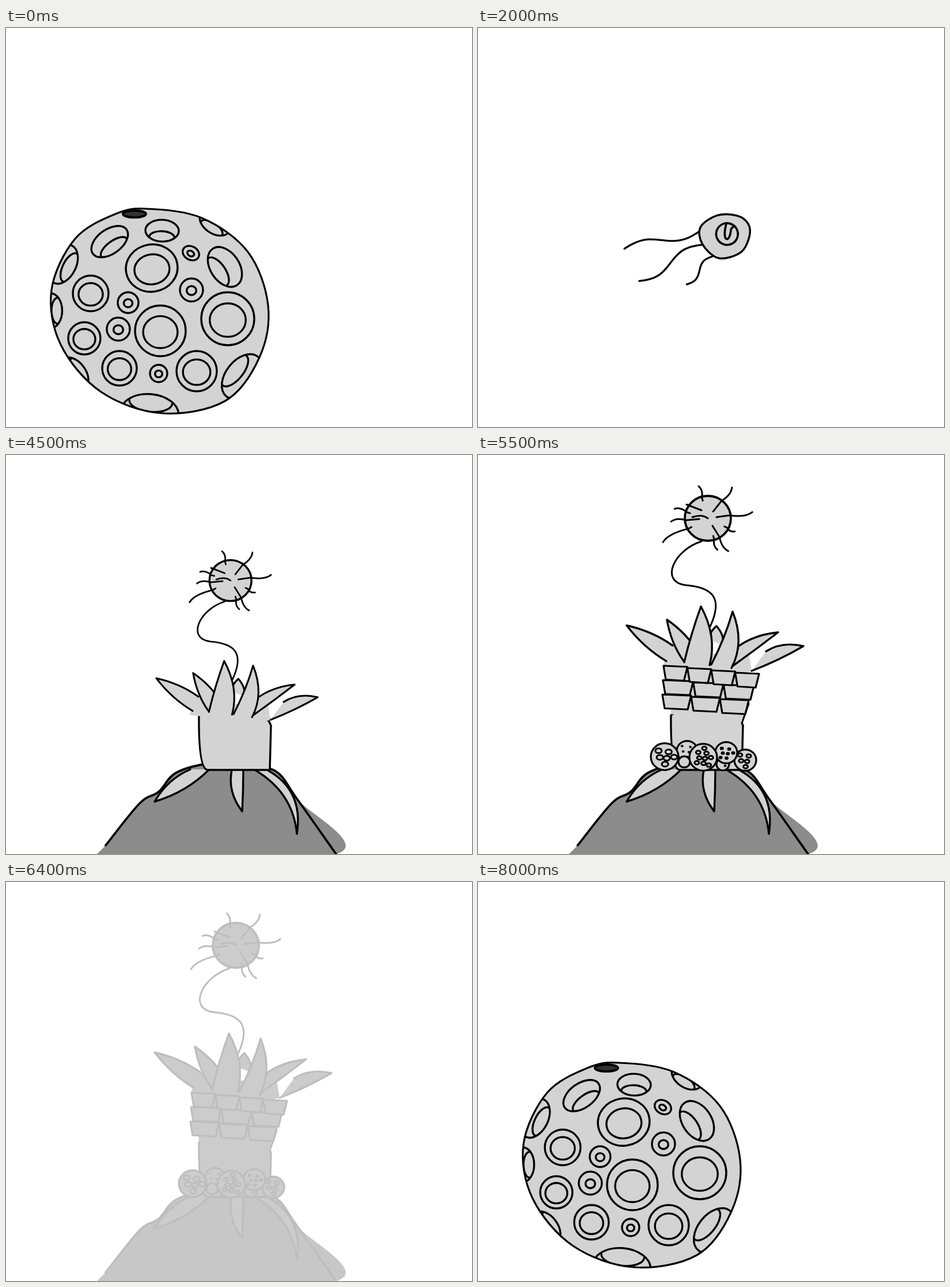
Animation of 809 by 693 pixels, one loop 8.1 s. Source, as an HTML page with a canvas:

```html
<!DOCTYPE html>
<html lang="en">
<head>
<meta charset="utf-8">
<title>Life cycle sketch</title>
<style>
html, body { margin: 0; width: 100%; height: 100%; overflow: hidden; background: #fff; }
canvas { display: block; }
</style>
</head>
<body>
<canvas width="809" height="693"></canvas>
<script>
const ctx = document.querySelector('canvas').getContext('2d');
const PALE = '#d3d3d3', ROCK = '#8c8c8c', TURN = Math.PI * 2;

function ink(path, fill, width = 3) {
  if (fill) { ctx.fillStyle = fill; ctx.fill(path); }
  if (width) { ctx.lineWidth = width; ctx.stroke(path); }
}
const draw = (d, fill, width) => ink(new Path2D(d), fill, width);

// Smooth path through a few key points.
function smooth(n, closed) {
  const size = n.length / 2;
  const at = i => {
    i = closed ? (i + size) % size : Math.max(0, Math.min(size - 1, i));
    return [n[2 * i], n[2 * i + 1]];
  };
  const path = new Path2D();
  path.moveTo(...at(0));
  for (let i = 0; i < size - (closed ? 0 : 1); i++) {
    const [a, b, c, d] = [at(i - 1), at(i), at(i + 1), at(i + 2)];
    path.bezierCurveTo(b[0] + (c[0] - a[0]) / 6, b[1] + (c[1] - a[1]) / 6,
      c[0] - (d[0] - b[0]) / 6, c[1] - (d[1] - b[1]) / 6, c[0], c[1]);
  }
  return path;
}

function oval(x, y, rx, ry = rx, fill = null, width = 3, from = 0, to = TURN) {
  const path = new Path2D();
  path.ellipse(x, y, rx, ry, 0, from, to);
  ink(path, fill, width);
}

function placed(shape, x, y, scale, angle = 0, ox = 0, oy = 0) {
  ctx.save();
  ctx.translate(x, y);
  ctx.rotate(angle);
  ctx.scale(scale, scale);
  ctx.translate(-ox, -oy);
  shape();
  ctx.restore();
}

const MOON = { x: 266, y: 491, rx: 188, ry: 178 };

// Craters seen at a slant show only the far lip of their floor.
function crater(x, y, r, squash = 1) {
  const out = Math.atan2(y - MOON.y, x - MOON.x) + TURN / 4;
  const h = r * squash, floor = r < 21 ? 0.42 : 0.68;
  placed(() => {
    oval(0, 0, r, h, null, 3.4);
    if (squash < 0.75) oval(0, h * 0.6, r * 0.75, h * 0.55, null, 3.4, TURN / 2, TURN);
    else oval(0, r * 0.05, r * floor, h * floor * 0.93, null, 3.4);
  }, x, y, 1, squash < 1 ? out : 0);
}

function moon() {
  const body = smooth([245, 314, 340, 330, 420, 389, 455, 482, 440, 572, 380, 648,
    270, 669, 165, 632, 95, 550, 79, 455, 120, 366, 190, 323], true);
  ink(body, PALE, 0);
  ctx.save();
  ctx.clip(body);
  [[271, 352, 29], [180, 371, 36], [321, 391, 15], [253, 417, 45], [380, 415, 38]]
    .forEach(([x, y, r]) => {
      const d = Math.hypot(x - MOON.x, y - MOON.y) / 183;
      crater(x, y, r, Math.sqrt(1 - d * d));
    });
  [[322, 455, 20], [147, 461, 31], [212, 477, 18], [195, 523, 20], [136, 539, 28],
   [268, 526, 44], [385, 505, 46], [197, 591, 30], [265, 600, 15], [331, 596, 35]]
    .forEach(c => crater(...c));
  [[95, 50], [40, 44], [142, 32], [180, 30], [207, 36], [301, 29]].forEach(([deg, r]) => {
    const a = deg / 360 * TURN;
    crater(MOON.x + MOON.rx * Math.cos(a), MOON.y + MOON.ry * Math.sin(a), r, 0.65);
  });
  oval(223, 323, 20, 6, '#333', 4);
  ctx.restore();
  ink(body, null, 3.2);
}

// S-shaped thread: one sine wave along the straight way between its ends.
function tail(x1, y1, x2, y2, amp, width) {
  const dx = x2 - x1, dy = y2 - y1, len = Math.hypot(dx, dy), pts = [];
  for (let i = 0; i <= 12; i++) {
    const s = i / 12, w = amp * Math.sin(TURN * s) / len;
    pts.push(x1 + dx * s - dy * w, y1 + dy * s + dx * w);
  }
  ink(smooth(pts), null, width);
}

const nucleus = (x, y, scale, angle) => placed(() => {
  oval(0, 0, 23, 23, null, 4.5);
  draw('M-7 -18C-7 18 10 18 6 -8Q4 -16 12 -20', null, 4.5);
}, x, y, scale, angle);

function swimmer() {
  tail(512, 318, 368, 394, -9, 4);
  tail(524, 344, 416, 452, 10, 4);
  tail(552, 362, 515, 433, 7, 4);
  ink(smooth([512, 308, 540, 275, 580, 265, 607, 275, 617, 300, 608, 338, 566, 362, 525, 342], true), PALE, 4.2);
  nucleus(570, 308, 1, 0);
}
const swim = (x, y, scale, angle) => placed(swimmer, x, y, scale, angle, 492, 358);

function settler() {
  tail(358, 545, 328, 661, -7);
  tail(380, 552, 382, 665, 9);
  tail(404, 545, 424, 601, 6);
  ink(smooth([387, 474, 413, 487, 420, 520, 408, 547, 383, 551, 354, 538, 356, 497], true), PALE, 3.5);
  nucleus(385, 510, 0.75, -0.8);
}

function mound() {
  const ridge = [173, 678, 232, 605, 265, 585, 295, 552, 353, 536, 415, 542, 468, 549, 505, 597, 573, 693];
  ink(smooth([...ridge, 158, 693]), ROCK, 0);
  ink(smooth(ridge), null, 3.8);
}

// Pointed leaf from two base points to a tip; bow bends it sideways.
function blade(x1, y1, tipX, tipY, x2, y2, bow = 0, bulge = 9) {
  const mx = (x1 + x2) / 2, my = (y1 + y2) / 2, len = Math.hypot(tipX - mx, tipY - my);
  const nx = (my - tipY) / len, ny = (tipX - mx) / len;
  const side = Math.sign((x1 - mx) * nx + (y1 - my) * ny);
  const bend = (x, y, w) => `${(x + tipX) / 2 + nx * w} ${(y + tipY) / 2 + ny * w}`;
  draw(`M${x1} ${y1}Q${bend(x1, y1, bow + side * bulge)} ${tipX} ${tipY}
    Q${bend(x2, y2, bow - side * bulge)} ${x2} ${y2}`, PALE, 3.4);
}

function stump() {
  blade(353, 546, 258, 602, 320, 546, 0, 14);
  blade(392, 547, 410, 619, 412, 547, 8);
  blade(432, 547, 505, 658, 455, 548, -38, 4);
  draw('M458 547H350Q334 545 335 452Q350 440 390 440Q450 440 460 470L458 547', PALE, 3.4);
}

function ball() {
  oval(0, 0, 40, 39, PALE, 3.8);
  [[-106, 58], [-52, 68], [-164, 60], [175, 64], [152, 88], [-8, 78], [26, 52], [58, 67], [73, 57]]
    .forEach(([deg, reach], i) => {
      const a = deg / 360 * TURN, point = (r, turn = 0) =>
        `${r * Math.cos(a + turn)} ${r * Math.sin(a + turn)}`;
      draw(`M${point(i % 2 ? 15 : 32)}L${point(38)}Q${point(reach * 0.85, 0.12)} ${point(reach)}`);
    });
  draw('M-27 -2Q-10 -8 0 0M-37 -24L-11 -14');
}

function head() {
  draw('M322 362 338 331 400 345 470 345 475 375 455 380 322 366Z', PALE, 0);
  draw('M388 150C340 165 315 220 360 226C410 230 425 250 403 298');
  blade(338, 331, 258, 296, 327, 358);
  blade(500, 341, 565, 332, 475, 375, -5);
  blade(434, 347, 521, 308, 440, 368, -8);
  blade(403, 322, 414, 297, 425, 330);
  blade(382, 343, 328, 286, 357, 358);
  blade(405, 364, 442, 272, 440, 370, 14);
  blade(358, 360, 387, 263, 402, 365, 9, 12);
  placed(ball, 399, 110, 1);
}

// Overlapping rows of flared plates.
function tiers() {
  draw('M326 368 480 380 458 468 335 450Z', PALE, 0);
  for (let row = 2; row >= 0; row--) {
    const count = row ? 3 : 4, left = 322 - row, w = (166 - row * 8) / count;
    for (let i = 0; i < count; i++) {
      const x = left + i * w, y = 366 + row * 25 + i * 4;
      draw(`M${x} ${y}l${w} 2l-6 24l${10 - w} -2Z`, PALE, 3.2);
    }
  }
  draw('M470 432 458 466');
}

function pebble(x, y, r, spots, size) {
  oval(x, y, r, r * 0.97, PALE, 3.2);
  for (let i = 0; i < spots; i++) {
    const a = i * 2.4 + 0.6, d = r * 0.72 * Math.sqrt((i + 0.4) / spots);
    oval(x + d * Math.cos(a), y + d * Math.sin(a), size, size * 0.75);
  }
}

function pebbles() {
  pebble(363, 514, 18, 5, 0.8);
  pebble(358, 533, 10, 0);
  pebble(464, 530, 19, 5, 4);
  pebble(425, 537, 11, 1, 1);
  pebble(431, 517, 19, 7, 2);
  pebble(324, 524, 24, 6, 5.5);
  pebble(391, 525, 24, 9, 4);
}

const rooted = () => { mound(); stump(); };
const grown = () => { rooted(); head(); tiers(); };

// One drawing per half second.
const scenes = [
  moon,
  () => { moon(); placed(swimmer, 254, 127, 0.565); },
  () => { placed(moon, -400, -229, 1.97); swimmer(); },
  () => swim(364, 393, 0.877, 0.44),
  () => swim(360, 381, 0.82, 0.26),
  () => swim(360, 353, 0.82, 0),
  () => { placed(mound, 366, 693, 0.643, 0, 366, 693); placed(settler, 0, -146, 1); },
  () => { mound(); settler(); },
  rooted,
  () => { rooted(); placed(head, 25.4, 117.6, 0.913); },
  grown,
  () => { grown(); pebbles(); }
];

// Washes the drawing out through grey to white; k = 1 leaves it untouched.
function fade(k) {
  const grey = 255 - 150 * k ** 0.6;
  ctx.save();
  ctx.globalCompositeOperation = 'source-atop';
  ctx.globalAlpha = 1 - k ** 1.5;
  ctx.fillStyle = `rgb(${grey}, ${grey}, ${grey})`;
  ctx.fillRect(0, 0, 809, 693);
  ctx.restore();
}

function frame(now) {
  const t = now % 8100, step = from => Math.floor((t - from) / 100);
  let index = Math.floor(t / 500), k = 1;
  if (t >= 7500) {
    index = 0;
    k = (step(7500) + 1) / 6;
  } else if (t >= 6000) {
    index = 11;
    k = Math.max(0, 5 - step(6000)) / 6;
  }
  ctx.clearRect(0, 0, 809, 693);
  ctx.lineCap = ctx.lineJoin = 'round';
  if (k > 0) scenes[index]();
  if (k < 1) fade(k);
}

const start = performance.now();
(function loop() {
  frame(performance.now() - start);
  requestAnimationFrame(loop);
})();
</script>
</body>
</html>
```
